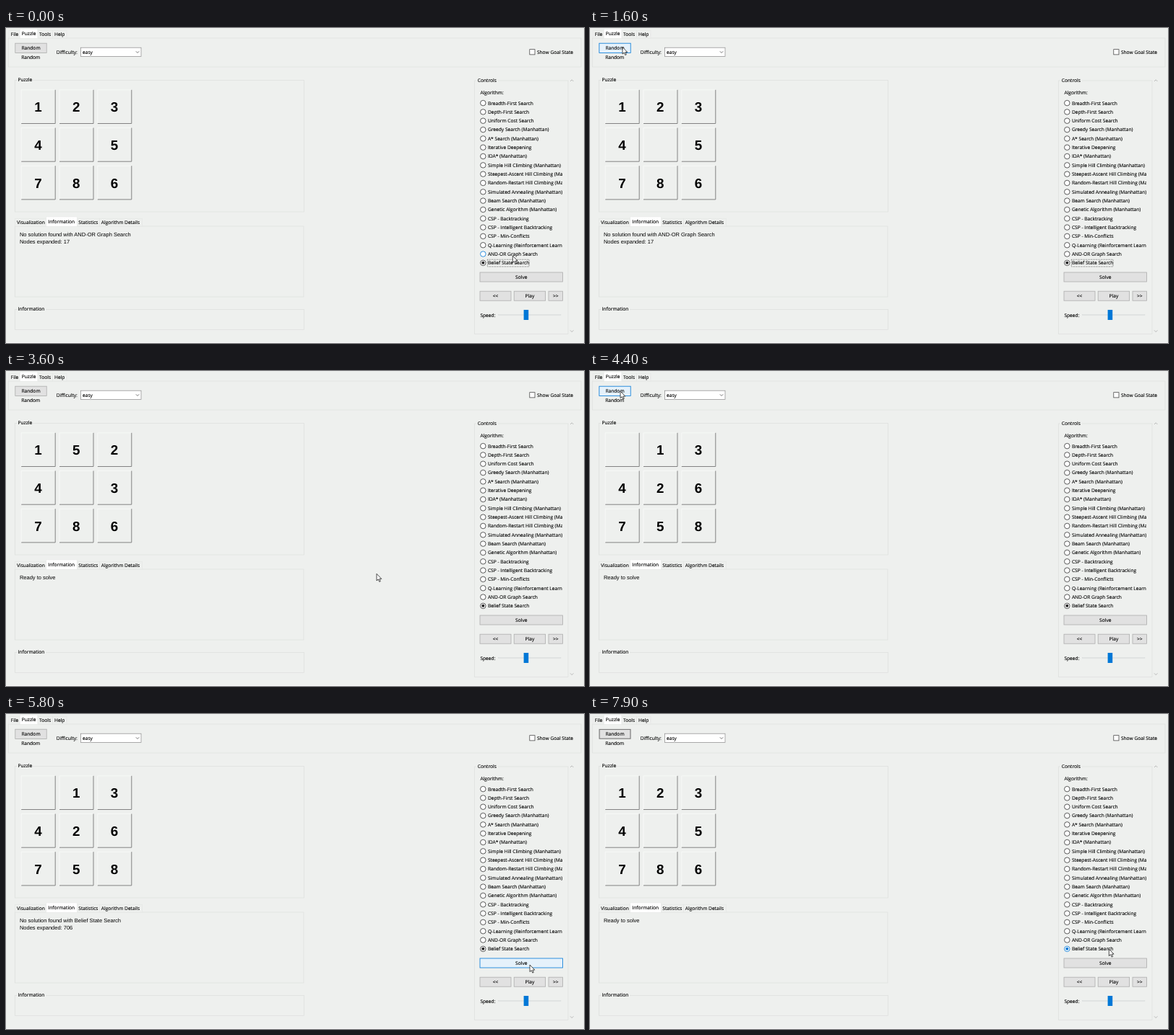
An HTML page for the animation above (8 s loop, 800x437 px).

```html
<!DOCTYPE html>
<html lang="en">
<head>
<meta charset="utf-8">
<title>Puzzle solver</title>
<style>
  html, body { margin: 0; width: 100%; height: 100%; overflow: hidden; background: #eef0ee; }
  svg { display: block; width: 100vw; height: 100vh; }
  text { font: 6.65px "Open Sans", "Noto Sans", sans-serif; fill: #000; stroke: #000; stroke-width: 0.12px; text-rendering: geometricPrecision; white-space: pre; }
  .mid { text-anchor: middle; }
  .info { font: 7.5px "Liberation Sans", Arial, sans-serif; stroke: none; }
  .digit { font: bold 18.75px "Liberation Sans", Arial, sans-serif; text-anchor: middle; stroke: none; }
</style>
</head>
<body>
<svg id="stage" viewBox="0 0 800 437"></svg>
<script>
const LOOP = 8000, STEP = 100;
const BG = '#eef0ee', LINE = '#dcdedc', BLUE = '#0078d7';
const stage = document.getElementById('stage');

function add(tag, attrs, parent = stage) {
  const el = document.createElementNS('http://www.w3.org/2000/svg', tag);
  set(el, attrs);
  parent.appendChild(el);
  return el;
}
function set(el, attrs) {
  for (const key in attrs) el.setAttribute(key, attrs[key]);
}
function label(text, x, y, cls = '', parent = stage) {
  const el = add('text', { x, y, class: cls }, parent);
  el.textContent = text;
  return el;
}
function box(x, y, right, bottom, fill = 'none', stroke = LINE, width = 0.7) {
  return add('rect', { x, y, width: right - x, height: bottom - y, fill, stroke, 'stroke-width': width });
}
function path(d, stroke, width = 0.8) {
  return add('path', { d, fill: 'none', stroke, 'stroke-width': width });
}
function group(title, x, y, right, bottom, titleWidth) {
  box(x, y, right, bottom);
  add('rect', { x: x + 3.2, y: y - 3, width: titleWidth, height: 6, fill: BG });
  label(title, x + 4.2, y + 2.1);
}
function tab(title, x, right, y, bottom, textX, selected) {
  if (selected) box(x, y, right, bottom, '#fff', '#e6e8e6', 0.5);
  else box(x, y + 1.2, right, bottom, BG, '#e3e5e3', 0.6);
  label(title, textX, bottom - (selected ? 3.9 : 2.6));
}
function button(title, x, y, right, bottom) {
  const rect = box(x, y, right, bottom, '#e1e1e1', '#adadad', 0.8);
  const ring = box(x + 0.3, y + 0.3, right - 0.3, bottom - 0.3, 'none', '#777', 0.9);
  label(title, (x + right) / 2, (y + bottom) / 2 + 2.5, 'mid');
  const hit = p => p.x >= x && p.x <= right && p.y >= y && p.y <= bottom;
  return (p, focused, pressed) => {
    const over = hit(p);
    set(rect, {
      fill: over ? (pressed ? '#cce4f7' : '#e5f1fb') : '#e1e1e1',
      stroke: over ? (pressed ? '#005499' : BLUE) : '#adadad'
    });
    set(ring, { visibility: focused && !over ? 'visible' : 'hidden' });
  };
}

add('rect', { width: 800, height: 437, fill: BG });
add('rect', { y: 436, width: 800, height: 1, fill: '#fafafa' });

// Toolbar
box(3.2, 14, 796, 54);
tab('File', 4, 19, 2, 14, 6.8);
tab('Tools', 44, 64.5, 2, 14, 46);
tab('Help', 64.5, 84, 2, 14, 67);
tab('Puzzle', 19.2, 43.8, 1.2, 14.3, 21.8, true);
const randomButton = button('Random', 12.8, 21.2, 56.2, 34.4);
label('Random', 34.2, 43.1, 'mid');
label('Difficulty:', 69.8, 35.8);
box(103.6, 27.2, 187, 39.4, '#fff', '#8a8a8a');
label('easy', 106, 35.6);
path('M179.8 32.3 L182 34.5 L184.2 32.3', '#555');
box(724.8, 29.7, 732, 36.9, '#fff', '#333');
label('Show Goal State', 734.9, 35.8);

// Board
group('Puzzle', 12.3, 72.3, 412.5, 255, 21);
const cells = Array.from({ length: 9 }, (_, i) => {
  const x = 21.2 + (i % 3) * 52.8, y = 85.8 + Math.floor(i / 3) * 52.7;
  path(`M${x} ${y + 47} V${y} H${x + 47}`, '#fafbfa', 0.8);
  path(`M${x} ${y + 46.7} H${x + 47} V${y}`, '#777', 0.9);
  return label('', x + 23.2, y + 30.4, 'digit');
});

// Output
box(12.3, 275, 412, 373);
tab('Visualization', 12.5, 56, 263, 275, 15);
tab('Statistics', 98, 129.5, 263, 275, 100.3);
tab('Algorithm Details', 129.5, 188.5, 263, 275, 131.8);
tab('Information', 55.8, 98.3, 262, 275.3, 58.3, true);
const messages = [label('', 18.9, 289.4, 'info'), label('', 18.9, 298.8, 'info')];
group('Information', 12.3, 390.3, 412.5, 418.3, 39);

// Controls
group('Controls', 648.6, 73, 778, 424.3, 29);
label('Algorithm:', 656.4, 92);
add('rect', { x: 650, y: 95, width: 120, height: 240 },
  add('clipPath', { id: 'list' }));
const list = add('g', { 'clip-path': 'url(#list)' });
const algorithms = [
  'Breadth-First Search', 'Depth-First Search', 'Uniform Cost Search',
  'Greedy Search (Manhattan)', 'A* Search (Manhattan)', 'Iterative Deepening',
  'IDA* (Manhattan)', 'Simple Hill Climbing (Manhattan)',
  'Steepest-Ascent Hill Climbing (Manhattan)', 'Random-Restart Hill Climbing (Manhattan)',
  'Simulated Annealing (Manhattan)', 'Beam Search (Manhattan)',
  'Genetic Algorithm (Manhattan)', 'CSP - Backtracking',
  'CSP - Intelligent Backtracking', 'CSP - Min-Conflicts',
  'Q-Learning (Reinforcement Learning)', 'AND-OR Graph Search', 'Belief State Search'
];
const radios = algorithms.map((name, i) => {
  const cy = 104.1 + i * 12.32;
  const ring = add('circle', { cx: 660.3, cy, r: 3.75, fill: '#fff', 'stroke-width': 0.8 }, list);
  label(name, 666.9, cy + 2.4, '', list);
  return { cy, ring };
});
const dot = add('circle', { cx: 660.3, cy: radios[18].cy, r: 2 });
const focusBox = box(666.3, 321.2, 724, 331, 'none', '#222', 0.6);
set(focusBox, { 'stroke-dasharray': '0.7 0.7' });
const solveButton = button('Solve', 656, 339, 770.6, 352);
const idleButtons = [
  button('<<', 656, 365.2, 699, 378.2),
  button('Play', 703.2, 365.2, 746.6, 378.2),
  button('>>', 751, 365.2, 770.6, 378.2)
];
label('Speed:', 656.4, 400.5);
box(681.4, 397.4, 768, 398.6, '#e7eaea', '#d2d4d4', 0.4);
add('rect', { x: 716.6, y: 391, width: 6.6, height: 14, fill: BLUE });
path('M781 74 L783.2 71.8 L785.4 74', '#aaa');
path('M781 419.4 L783.2 421.6 L785.4 419.4', '#aaa');

const pointer = add('path', {
  d: 'M0 0 V9.6 L2.2 7.6 L3.8 11.1 L5.3 10.4 L3.8 7.1 H6.8 Z',
  fill: '#fff', stroke: '#111', 'stroke-width': 0.75, 'stroke-linejoin': 'round'
});

// Pointer stops: time, x, y
const route = [
  [0, 701.3, 316], [200, 700, 316], [1300, 45, 26.5], [1800, 45, 26.5],
  [2400, 798.6, 345], [2700, 740, 340], [3600, 513, 281.3], [4200, 42, 28],
  [4400, 42, 28], [5000, 799.2, 360], [5500, 725, 348], [6100, 725, 348],
  [6900, 372.3, 219.3], [7250, 40, 29], [7400, 40, 29], [7900, 718.3, 326], [8000, 718.3, 326]
];
function pointerAt(t) {
  const i = route.findIndex((stop, n) => n > 0 && t <= stop[0]);
  const [t0, x0, y0] = route[i - 1], [t1, x1, y1] = route[i];
  const u = (t - t0) / (t1 - t0), ease = u * u * (3 - 2 * u);
  return { x: x0 + (x1 - x0) * ease, y: y0 + (y1 - y0) * ease };
}

const READY = ['Ready to solve', ''];
const failed = (name, nodes) => [`No solution found with ${name}`, `Nodes expanded: ${nodes}`];
const states = [
  { from: 0, board: '1234 5786', text: failed('AND-OR Graph Search', 17), focus: 'list' },
  { from: 1700, board: '1524 3786', text: READY, focus: 'random' },
  { from: 2800, board: '1524 3786', text: READY, focus: '' },
  { from: 4300, board: ' 13426758', text: READY, focus: 'random' },
  { from: 5600, board: ' 13426758', text: failed('Belief State Search', 706), focus: 'solve' },
  { from: 7300, board: '1234 5786', text: READY, focus: 'random' }
];
const clicks = [1700, 4300, 5600, 7300];

function render(time) {
  const t = Math.floor((time % LOOP) / STEP) * STEP;
  const p = pointerAt(t);
  const state = states.filter(s => s.from <= t).pop();
  const pressed = clicks.includes(t);

  cells.forEach((cell, i) => cell.textContent = state.board[i].trim());
  messages.forEach((line, i) => line.textContent = state.text[i]);

  radios.forEach(({ cy, ring }, i) => {
    const over = p.x > 656 && p.x < 770 && Math.abs(p.y - cy) < 6.16;
    set(ring, { stroke: over ? BLUE : '#333' });
    if (i === 18) set(dot, { fill: over ? BLUE : '#222' });
  });
  set(focusBox, { visibility: state.focus === 'list' ? 'visible' : 'hidden' });
  randomButton(p, state.focus === 'random', pressed);
  solveButton(p, state.focus === 'solve', pressed);
  idleButtons.forEach(update => update(p, false, false));
  set(pointer, { transform: `translate(${p.x} ${p.y})` });
}

const start = performance.now();
function tick() {
  render(performance.now() - start);
  requestAnimationFrame(tick);
}
render(0);
requestAnimationFrame(tick);
</script>
</body>
</html>
```
